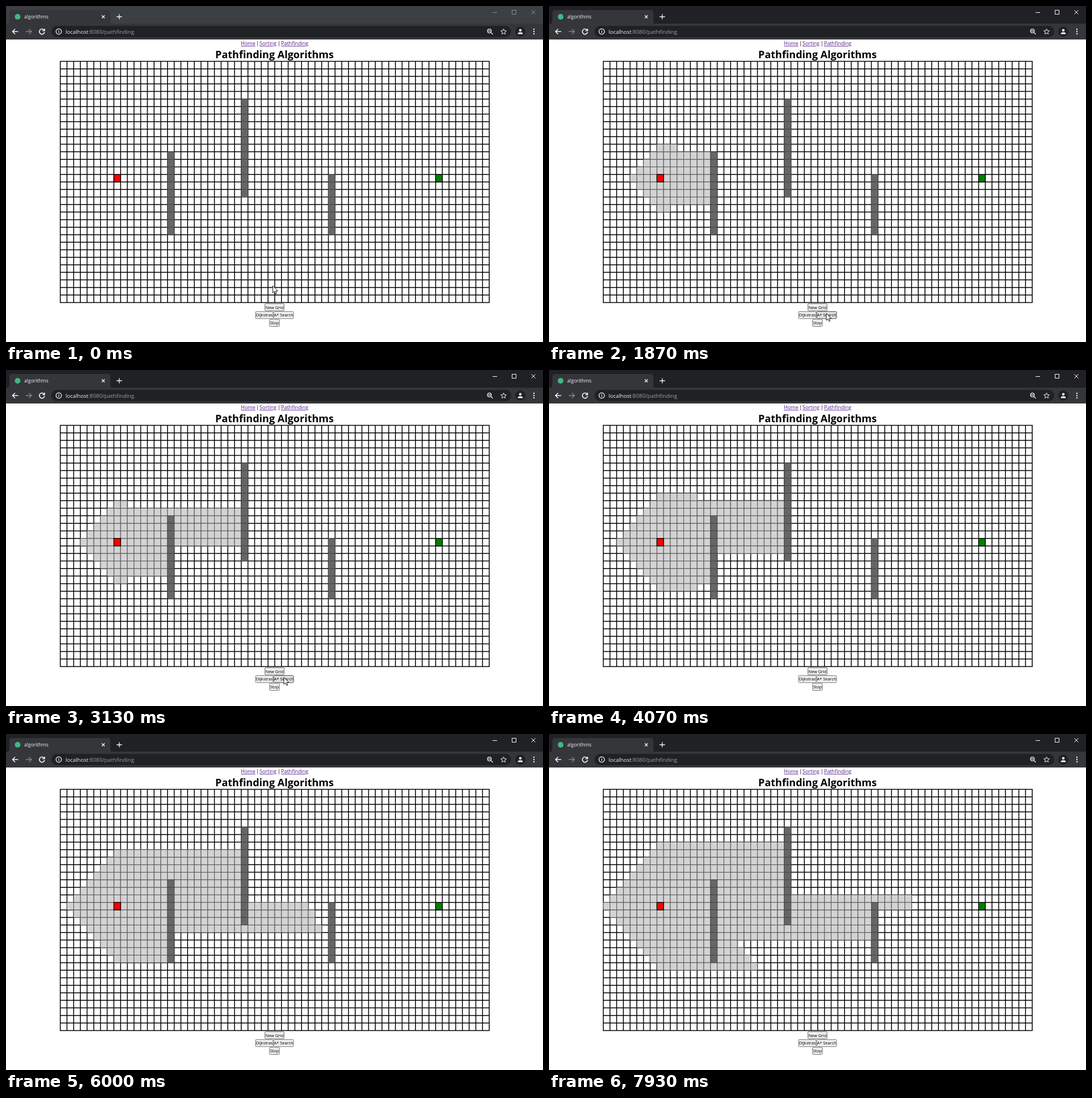
Write an HTML page that moves like this. It is 947 px wide and 592 px high and loops after 8000 ms.

```html
<!DOCTYPE html>
<html lang="en">
<head>
<meta charset="utf-8">
<title>Pathfinding Algorithms</title>
<style>
html, body { margin: 0; width: 100%; height: 100%; overflow: hidden; background: #fff; }
svg { display: block; width: 947px; height: 592px; font-family: "Open Sans", "Noto Sans", sans-serif; }
.line { fill: none; stroke: #f1f3f4; stroke-width: 1.3; }
.links { font-size: 9px; }
.links .a { fill: #551a8b; text-decoration: underline; }
.btn rect { fill: #efefef; stroke: #767676; stroke-width: 1; }
.btn text { font-size: 7.4px; text-anchor: middle; }
.btn.hover rect { fill: #e2e2e2; stroke: #444; }
</style>
</head>
<body>
<svg viewBox="0 0 947 592">
  <rect id="strip" width="947" height="32"/>
  <path d="M2 32Q6 31 6 27V12Q6 7 11 7H179Q184 7 184 12V27Q184 31 188 32Z" fill="#35363a"/>
  <rect y="31" width="947" height="28" fill="#35363a"/>
  <rect x="80" y="35" width="811" height="20" rx="10" fill="#202124"/>
  <circle cx="20.5" cy="19" r="5" fill="#41b883"/>
  <g fill="#f1f3f4">
    <text x="32" y="22.4" font-size="8.6">algorithms</text>
    <text x="105" y="48.7" font-size="9.6">localhost</text>
    <text x="145" y="48.7" font-size="9.8" fill="#9aa0a6">:8080/pathfinding</text>
  </g>
  <g class="line">
    <path d="M169 16.5l5 5m0-5l-5 5M195 19h9.500M199.700 14.500v9"/>
    <path d="M21.500 45H11.500M16 40.500L11.500 45l4.500 4.500" stroke-width="1.6"/>
    <path d="M35 45h10M40.500 40.500L45 45l-4.500 4.500" stroke="#85888c"/>
    <path d="M67.300 42.500A4.600 4.600 0 1 0 68 46M68 40v3.500h-3.800" stroke-width="1.6"/>
    <circle cx="93" cy="45" r="4.800"/>
    <path d="M93 44.300v3.200M93 42.200v1.200"/>
    <path d="M855.500 47l3 3M850.500 44h4" />
    <circle cx="852.500" cy="44" r="3.300"/>
    <path d="M877.500 40.300l1.400 3.200 3.500.3-2.700 2.300.8 3.400-3-1.800-3 1.800.8-3.400-2.700-2.300 3.500-.3z" stroke-width="1"/>
  </g>
  <circle cx="907" cy="45" r="9" fill="#202124"/>
  <g fill="#f1f3f4">
    <circle cx="907" cy="42.700" r="2.300"/>
    <path d="M902.500 49.500q0-3.300 4.500-3.300t4.500 3.300z"/>
    <circle cx="931" cy="41" r="1.200"/><circle cx="931" cy="45" r="1.200"/><circle cx="931" cy="49" r="1.200"/>
  </g>
  <path id="controls" d="M858 11.500h8M892.500 7.500h7v7h-7zM926.500 7.500l7 7m0-7l-7 7" fill="none"/>

  <g class="links">
    <text class="a" x="414.300" y="69.300">Home</text><text x="441.300" y="69.300">|</text>
    <text class="a" x="447" y="69.300">Sorting</text><text x="478.800" y="69.300">|</text>
    <text class="a" x="485" y="69.300">Pathfinding</text>
  </g>
  <text x="473.500" y="92.300" font-size="18" font-weight="700" text-anchor="middle">Pathfinding Algorithms</text>

  <path id="lines" fill="none" stroke="#000" stroke-width="1.5"/>
  <g id="cells"></g>

  <g class="btn"><rect x="456.500" y="524.500" width="34" height="12.500" rx="1.500"/><text x="473.500" y="533.600">New Grid</text></g>
  <g class="btn"><rect x="440" y="538.300" width="31" height="12.500" rx="1.500"/><text x="455.500" y="547.400">Dijkstras</text></g>
  <g class="btn" id="astar"><rect x="472" y="538.300" width="35" height="12.500" rx="1.500"/><text x="489.500" y="547.400">A* Search</text></g>
  <g class="btn"><rect x="464.700" y="552" width="17.500" height="12.500" rx="1.500"/><text x="473.500" y="561.100">Stop</text></g>
  <path id="cursor" d="M0 0V12.500L2.900 9.800 4.900 14.300 6.800 13.500 4.900 9.100H9z" fill="#fff" stroke="#000" stroke-width=".9"/>
</svg>
<script>
const COLS = 64, ROWS = 32, X0 = 95.7, Y0 = 97.5, W = 11.82, H = 13.28;
const LOOP = 8000, FPS = 15;
const START = [8, 15], GOAL = [56, 15];
const WALLS = [[16, 12, 22], [27, 5, 17], [40, 15, 22]]; // column, first row, last row
const el = id => document.getElementById(id);
const isWall = (x, y) => WALLS.some(([c, a, b]) => x === c && y >= a && y <= b);

// A* with Manhattan distance; equal scores leave in order of arrival.
function search(limit) {
  const order = [], best = {}, closed = new Set(), queues = [];
  const push = (x, y, g) => {
    const key = y * COLS + x;
    if (x < 0 || y < 0 || x >= COLS || y >= ROWS || isWall(x, y)) return;
    if (closed.has(key) || best[key] <= g) return;
    best[key] = g;
    const f = g + Math.abs(GOAL[0] - x) + Math.abs(GOAL[1] - y);
    (queues[f] ||= []).push({ x, y, g, key });
  };
  push(...START, 0);
  while (order.length < limit) {
    const { x, y, g, key } = queues.find(q => q && q.length).shift();
    if (closed.has(key)) continue;
    closed.add(key);
    order.push([x, y]);
    push(x, y - 1, g + 1);
    push(x, y + 1, g + 1);
    push(x - 1, y, g + 1);
    push(x + 1, y, g + 1);
  }
  return order;
}

function addCell([x, y], fill, stroke, width = 1) {
  const r = document.createElementNS("http://www.w3.org/2000/svg", "rect");
  const attrs = { x: X0 + x * W, y: Y0 + y * H, width: W, height: H, fill, stroke, "stroke-width": width };
  for (const name in attrs) r.setAttribute(name, attrs[name]);
  el("cells").append(r);
  return r;
}

let grid = "";
for (let i = 0; i <= COLS; i++) grid += `M${X0 + i * W} ${Y0 - .75}v${ROWS * H + 1.5}`;
for (let j = 0; j <= ROWS; j++) grid += `M${X0} ${Y0 + j * H}h${COLS * W}`;
el("lines").setAttribute("d", grid);

const visited = search(445).map(c => addCell(c, "#d3d3d3", "#555"));
for (const [c, a, b] of WALLS)
  for (let y = a; y <= b; y++) addCell([c, y], "#666", "#484848");
addCell(START, "#f00", "#000", 1.3);
addCell(GOAL, "#008000", "#000", 1.3);

const clamp01 = v => Math.min(1, Math.max(0, v));
const mix = (a, b, p) => a + (b - a) * p;
const ease = p => p * p * (3 - 2 * p);

function pointer(k) {
  const come = ease(clamp01(k / 5)), leave = clamp01((k - 53) / 7) ** 2;
  const x = mix(470.5, 489, come) + clamp01((k - 28) / 19);
  return [mix(x, 497, leave), mix(mix(493, 541.5, come), 597, leave)];
}

function draw(t) {
  let k = Math.floor(t * FPS / 1000 + .06);
  if (10 * Math.round(k * 100 / FPS) > t) k--;
  const count = Math.floor(77.2 + 3.985 * (k - 28));
  visited.forEach((r, i) => r.style.display = i < count ? "" : "none");

  const active = k >= 8;
  el("strip").setAttribute("fill", active ? "#202124" : "#3c4043");
  el("controls").setAttribute("stroke", active ? "#fff" : "#8b8e91");

  const [x, y] = pointer(k);
  el("cursor").setAttribute("transform", `translate(${x} ${y})`);
  el("astar").classList.toggle("hover", y > 538 && y < 551);
}

function tick(now) {
  draw(now % LOOP);
  requestAnimationFrame(tick);
}
draw(0);
requestAnimationFrame(tick);
</script>
</body>
</html>
```
